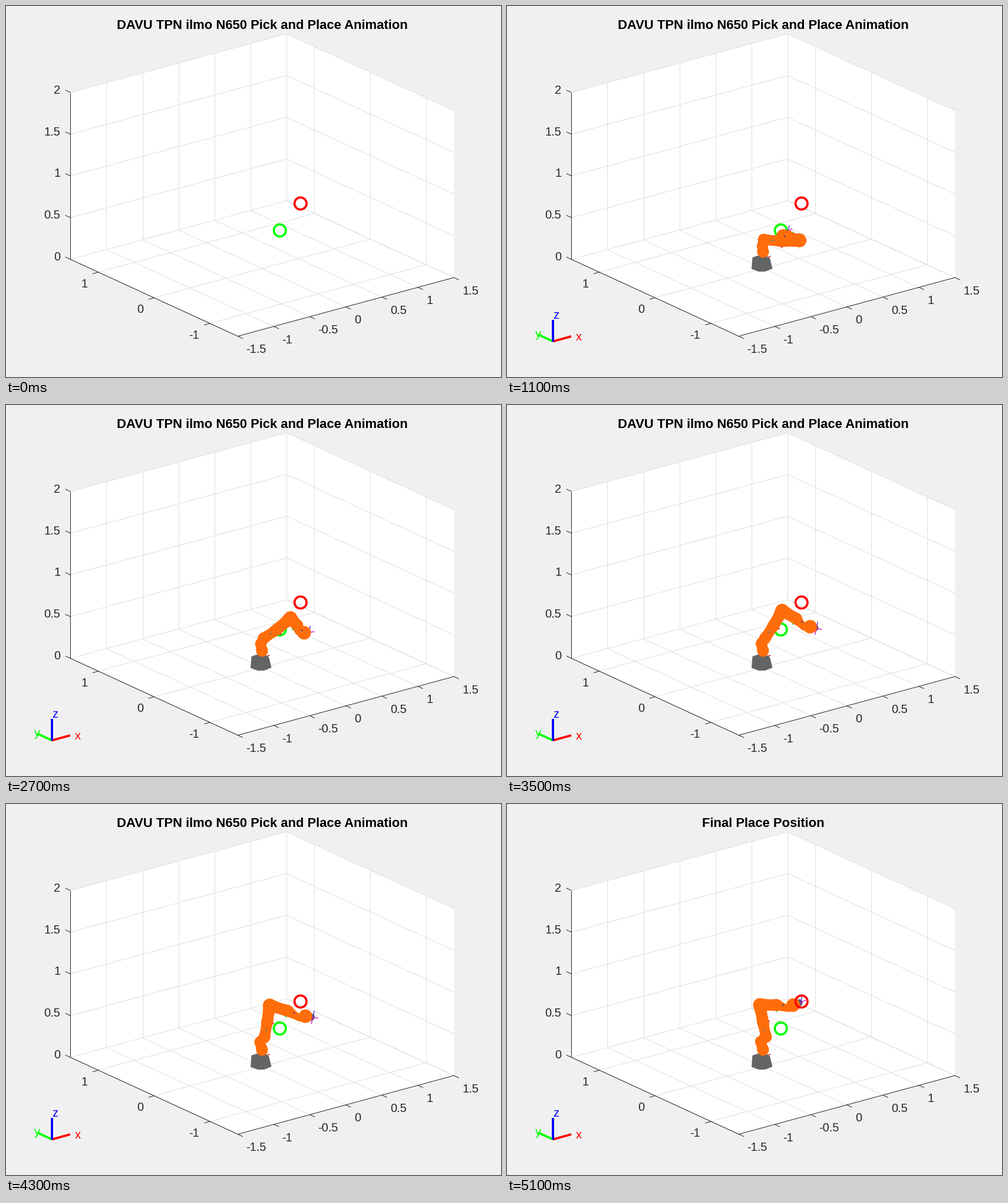
These frames come from a looping animation (840 by 630 pixels, 5200 ms). A matplotlib script:

```python
import matplotlib.pyplot as plt
import numpy as np
from matplotlib.animation import FuncAnimation
from matplotlib.collections import LineCollection
from matplotlib.patches import Circle, Polygon

W, H, DPI = 840, 630, 100
FRAMES, STEP_MS = 52, 100
MOVES = FRAMES - 2  # between the empty box and the closing title
PX = 72 / DPI  # points per pixel

ORANGE = "#ff6d0a"
STEEL = "#646464"
INK = "#262626"
GRID = "#dfdfdf"
RED, GREEN, BLUE = "#ff0000", "#00ff00", "#0000ff"

RUN_TITLE = "DAVU TPN ilmo N650 Pick and Place Animation"
END_TITLE = "Final Place Position"

plt.rcParams["font.family"] = "Liberation Sans"
fig = plt.figure(figsize=(W / DPI, H / DPI), dpi=DPI, facecolor="#f0f0f0")
ax = fig.add_axes([0, 0, 1, 1])
ax.set_xlim(0, W)
ax.set_ylim(H, 0)
ax.axis("off")


def project(x, y, z):
    """Orthographic view of the plot box, in stage pixels."""
    return np.array([434.7 + 122.3 * x - 94.7 * y,
                     445.65 - 33.2 * x - 43.5 * y - 141.7 * z])


def line(p, q, color, width=1.0, z=2):
    return ax.plot([p[0], q[0]], [p[1], q[1]], color=color, lw=width * PX,
                   solid_capstyle="butt", zorder=z)[0]


def label(x, y, text, ha="left", color=INK, size=20, **kw):
    return ax.text(x, y, text, ha=ha, va="baseline", color=color,
                   fontsize=size * PX, **kw)


# --- plot box -------------------------------------------------------------
A = 1.5
hull = [(-A, A, 0), (-A, A, 2), (A, A, 2), (A, -A, 2), (A, -A, 0), (-A, -A, 0)]
ax.add_patch(Polygon([project(*c) for c in hull], fc="white", lw=0, zorder=0))


def grid(*corners):
    for p, q in zip(corners, corners[1:]):
        line(project(*p), project(*q), GRID, z=1)


def tick(p, step, text, shift, ha):
    line(p, p + step, INK)
    label(*(p + shift), f"{text:g}", ha=ha)


for x in np.arange(-1.5, 1.6, 0.5):
    grid((x, -A, 0), (x, A, 0), (x, A, 2))
    tick(project(x, -A, 0), (8.5, 4), x, (14, 28.5), "left")
for y in (1, 0, -1):
    grid((-A, y, 0), (A, y, 0), (A, y, 2))
    tick(project(-A, y, 0), (-9.5, 2.8), y, (-18.3, 26), "right")
for z in np.arange(0, 2.1, 0.5):
    grid((-A, A, z), (A, A, z), (A, -A, z))
    tick(project(-A, A, z), (-8.5, -4), z, (-17, 2), "right")

corner = project(-A, -A, 0)
line(project(-A, A, 0), project(-A, A, 2), INK)
line(project(-A, A, 0), corner, INK)
line(corner, project(A, -A, 0), INK)

title = label(434.7, 39, RUN_TITLE, ha="center", color="black", size=22,
              weight="bold")

for spot, color, order in (((0.4, 0.2, 0.3), GREEN, 3),
                           ((0.3, -0.3, 0.8), RED, 9)):
    ax.add_patch(Circle(project(*spot), 10.2, fill=False, ec=color,
                        lw=3.7 * PX, zorder=order))

# --- parts that appear with the robot --------------------------------------
origin = np.array([78, 569.5])
robot = []
for arm, color, name, shift in (((-25, -11.5), GREEN, "y", (0, 5)),
                                ((31, -8.5), RED, "x", (13, 6.5)),
                                ((0, -37), BLUE, "z", (5, -1.5))):
    end = origin + arm
    robot.append(line(origin, end, color, 3.8))
    robot.append(label(*(end + shift), name, ha="center", color=color))

base = [(416.5, 427), (425, 424), (440, 424), (446, 428), (450.5, 446),
        (438, 451), (427, 451), (415, 446.5)]
robot.append(ax.add_patch(Polygon(base, fc=STEEL, lw=0, zorder=4)))

flange = ax.add_patch(Circle((0, 0), 6, fc=STEEL, lw=0, zorder=5))
body = ax.scatter([], [], c=ORANGE, linewidths=0, zorder=6)
tool_marks = LineCollection([], linewidths=1.4 * PX, zorder=5.5)
link_marks = LineCollection([], linewidths=1.4 * PX, zorder=7)
for marks in (tool_marks, link_marks):
    ax.add_collection(marks)
robot += [flange, body, tool_marks, link_marks]

RADII = {"foot": 10, "neck": 9.5, "shoulder": 9.8, "upper": 10,
         "elbow": 11.5, "fore": 10, "bend": 5.5, "wrist": 11.5}

# Bezier control points of the two free ends
WRIST_PATH = np.array([(449, 381), (469, 403), (560, 390), (485, 341)]) + 0.5
TIP_PATH = np.array([(465, 381), (466, 380), (575, 410), (498, 336)]) + 0.5


def bezier(points, s):
    while len(points) > 1:
        points = points[:-1] * (1 - s) + points[1:] * s
    return points[0]


def unit(v):
    return v / max(np.hypot(*v), 1e-6)


def right_of(v):
    return np.array([-v[1], v[0]])


def pose(s):
    """Joint positions on the stage for progress s from pick to place."""
    swing = np.radians(114.6 - 120.5 * s)
    j = {
        "foot": np.array([434.5, 417.5]),
        "neck": np.array([434.5 - 4 * s, 408.5 - 5 * s]),
        "shoulder": np.array([434.5 + 5 * s, 397 - 1.5 * s]),
        "elbow": np.array([435.5 + 61 * np.sin(swing),
                           398 - 57 * np.cos(swing)]),
        "wrist": bezier(WRIST_PATH, s),
        "tip": bezier(TIP_PATH, s),
    }
    j["upper"] = (j["shoulder"] + j["elbow"]) / 2 + (0, 2)
    j["fore"] = (j["elbow"] + j["wrist"]) / 2
    along = unit(j["wrist"] - j["fore"])
    j["bend"] = j["wrist"] - 9 * along + 6 * right_of(along)
    return j


def skin(j):
    """Discs along the chain, slightly waisted between joints."""
    names = list(RADII)
    u = np.linspace(0, 1, 14)[:, None]
    centers, radii = [], []
    for a, b in zip(names, names[1:]):
        centers.append(j[a] * (1 - u) + j[b] * u)
        r = RADII[a] * (1 - u) + RADII[b] * u
        radii.append(r * (1 - 0.1 * np.sin(np.pi * u)))
    return np.vstack(centers), np.vstack(radii).ravel()


def set_marks(collection, items):
    """Each item is a start, a step and a colour."""
    collection.set_segments([(p, p + np.array(d)) for p, d, _ in items])
    collection.set_color([c for _, _, c in items])


def draw_marks(j):
    """Small coordinate frames seen on the links and the tool."""
    up = unit(j["elbow"] - j["upper"])
    out = unit(j["fore"] - j["elbow"])
    mid = (j["shoulder"] + j["upper"]) / 2
    set_marks(link_marks, [
        (np.array([443.5, 426]), (4, -1), "#e00000"),
        (mid - 2.5 * up, 5 * up, "#5f7f80"),
        (j["upper"] + 9 * right_of(up), 3 * right_of(up), "#c01020"),
        (j["fore"] + 9 * right_of(out), 3 * right_of(out), "#20c020"),
        (j["fore"] + 10 * out, 3 * out, "#2020c0"),
    ])
    tip = j["tip"]
    set_marks(tool_marks, [
        (tip, (2, -11), "#5a20f0"),
        (tip, 9 * unit(tip - j["wrist"]), "#d010d0"),
        (tip, (-3, 11), "#c010b0"),
    ])


def draw(i):
    for part in robot:
        part.set_visible(i > 0)
    title.set_text(END_TITLE if i == FRAMES - 1 else RUN_TITLE)
    j = pose(np.clip((i - 1) / (MOVES - 1), 0, 1))
    centers, radii = skin(j)
    body.set_offsets(centers)
    body.set_sizes((2 * radii * PX) ** 2)
    flange.center = tuple(j["tip"] - 3 * unit(j["tip"] - j["wrist"]))
    draw_marks(j)
    return robot + [title]


anim = FuncAnimation(fig, draw, frames=FRAMES, interval=STEP_MS,
                     init_func=lambda: draw(0), repeat=True, repeat_delay=0,
                     blit=False)
plt.show()
```
